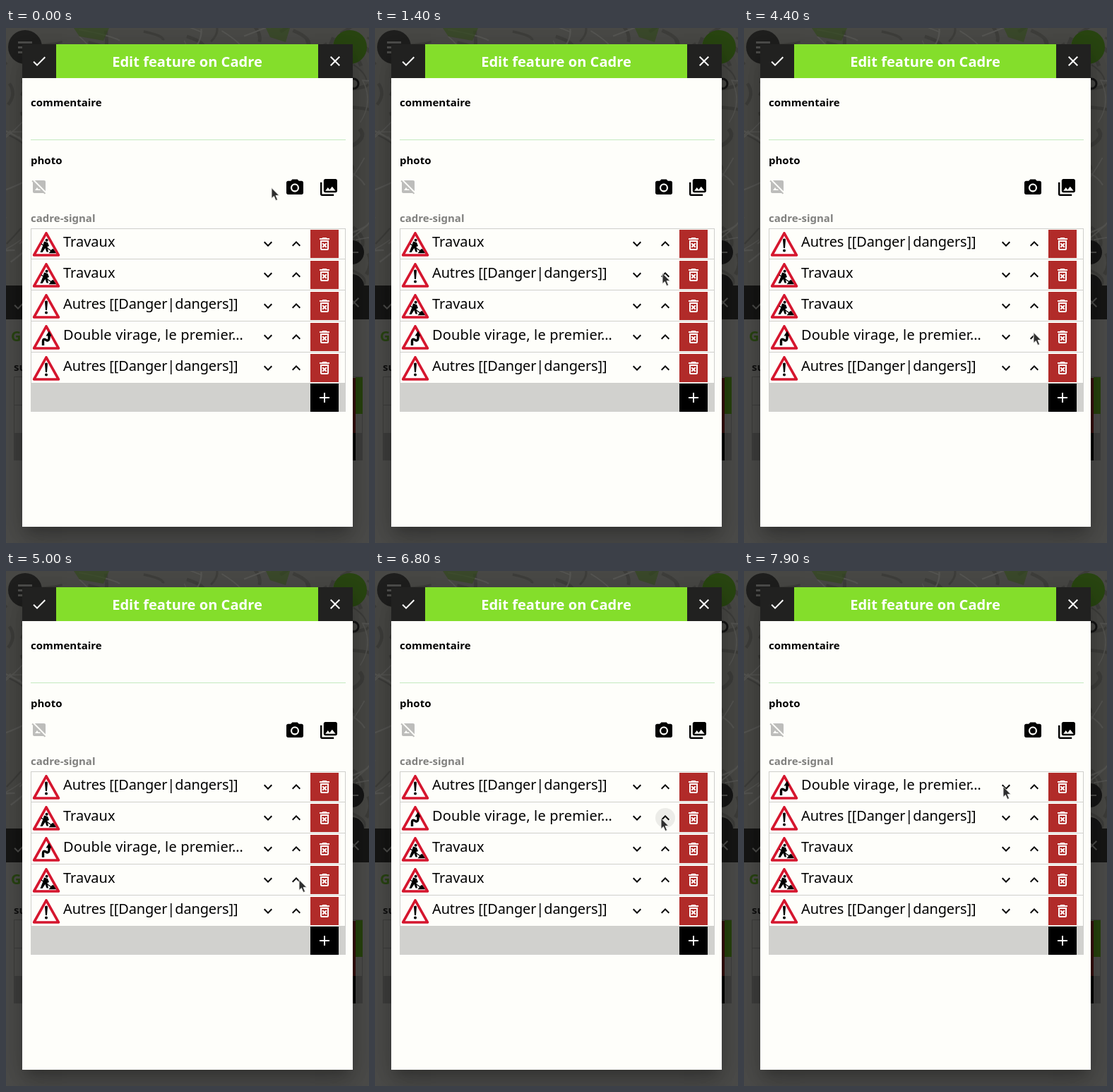
An HTML page that plays this animation: 514x730 px, repeating every 8 s.

```html
<!DOCTYPE html>
<html lang="en">
<head>
<meta charset="utf-8">
<title>Edit feature</title>
<style>
  html, body { margin: 0; width: 100%; height: 100%; overflow: hidden; background: #4d4d4b; }
  svg, .dialog { position: absolute; left: 0; top: 0; }
  svg { width: 514px; height: 730px; font-family: "Noto Sans", "Open Sans", sans-serif; }
  .dialog {
    left: 23px; top: 23px; width: 468px; height: 684px; background: #fefefa;
    box-shadow: 0 11px 15px -7px rgba(0,0,0,.2), 0 24px 38px 3px rgba(0,0,0,.14), 0 9px 46px 8px rgba(0,0,0,.12);
  }
  .title { font-size: 20.1px; font-weight: 700; fill: #fff; text-anchor: middle; }
  .label { font-size: 15px; font-weight: 700; }
  .name { font-size: 20px; }
  .tight { letter-spacing: -.14px; }
  .wide { letter-spacing: .17px; }
  .white { fill: #fff; }

  .item, .cursor, .ripple { animation: 8s step-end infinite; }
  .work1 { animation-name: work1; }
  .work2 { animation-name: work2; }
  .danger { animation-name: danger; }
  .bend { animation-name: bend; }
  .last { transform: translate(35px, 460px); }
  .cursor { animation-name: cursor; }
  .ripple { animation-name: ripple; fill: #000; }

  @keyframes work1 {
    0% { transform: translate(35px, 284px); }
    21.25% { transform: translate(35px, 328px); }
    70%, 100% { transform: translate(35px, 372px); }
  }
  @keyframes work2 {
    0% { transform: translate(35px, 328px); }
    11.25% { transform: translate(35px, 372px); }
    60%, 100% { transform: translate(35px, 416px); }
  }
  @keyframes danger {
    0% { transform: translate(35px, 372px); }
    11.25% { transform: translate(35px, 328px); }
    21.25% { transform: translate(35px, 284px); }
    86.25%, 100% { transform: translate(35px, 328px); }
  }
  @keyframes bend {
    0% { transform: translate(35px, 416px); }
    60% { transform: translate(35px, 372px); }
    70% { transform: translate(35px, 328px); }
    86.25%, 100% { transform: translate(35px, 284px); }
  }
  @keyframes ripple {
    0% { transform: translate(411px, 394px); opacity: 0; }
    10% { transform: translate(411px, 394px); opacity: .07; }
    11.25% { transform: translate(411px, 394px); opacity: .03; }
    12.5% { transform: translate(411px, 350px); opacity: 0; }
    20% { transform: translate(411px, 350px); opacity: .07; }
    21.25% { transform: translate(411px, 438px); opacity: 0; }
    58.75% { transform: translate(411px, 438px); opacity: .07; }
    60% { transform: translate(411px, 438px); opacity: .03; }
    61.25% { transform: translate(411px, 350px); opacity: 0; }
    85% { transform: translate(411px, 350px); opacity: .07; }
    86.25% { transform: translate(411px, 350px); opacity: .03; }
    87.5% { transform: translate(411px, 306px); opacity: 0; }
    93.75% { transform: translate(411px, 306px); opacity: .07; }
    96.25% { transform: translate(411px, 306px); opacity: .03; }
    97.5%, 100% { transform: translate(411px, 306px); opacity: 0; }
  }
  @keyframes cursor {
    0% { transform: translate(376px, 226px); }
    3.75% { transform: translate(393px, 285px); }
    5% { transform: translate(417px, 362px); }
    6.25% { transform: translate(426px, 392px); }
    8.75% { transform: translate(414px, 396px); }
    10% { transform: translate(408px, 397px); }
    12.5% { transform: translate(407px, 397px); }
    15% { transform: translate(407px, 383px); }
    16.25% { transform: translate(407px, 357px); }
    17.5% { transform: translate(407px, 347px); }
    25% { transform: translate(406px, 346px); }
    30% { transform: translate(405px, 345px); }
    32.5% { transform: translate(404px, 345px); }
    45% { transform: translate(404px, 352px); }
    46.25% { transform: translate(403px, 375px); }
    47.5% { transform: translate(405px, 396px); }
    48.75% { transform: translate(406px, 404px); }
    51.25% { transform: translate(407px, 409px); }
    52.5% { transform: translate(409px, 420px); }
    53.75% { transform: translate(410px, 428px); }
    55% { transform: translate(410px, 431px); }
    57.5% { transform: translate(413px, 437px); }
    58.75% { transform: translate(415px, 441px); }
    62.5% { transform: translate(415px, 437px); }
    65% { transform: translate(411px, 425px); }
    66.25% { transform: translate(407px, 416px); }
    68.75% { transform: translate(406px, 406px); }
    70% { transform: translate(406px, 403px); }
    75% { transform: translate(399px, 394px); }
    76.25% { transform: translate(387px, 378px); }
    77.5% { transform: translate(377px, 365px); }
    78.75% { transform: translate(375px, 361px); }
    81.25% { transform: translate(389px, 357px); }
    82.5% { transform: translate(402px, 351px); }
    83.75% { transform: translate(405px, 350px); }
    87.5% { transform: translate(406px, 333px); }
    88.75% { transform: translate(407px, 312px); }
    90% { transform: translate(407px, 305px); }
    95% { transform: translate(404px, 305px); }
    96.25% { transform: translate(391px, 305px); }
    97.5% { transform: translate(374px, 305px); }
    98.75%, 100% { transform: translate(367px, 305px); }
  }
</style>
</head>
<body>
<svg viewBox="0 0 514 730">
  <rect width="514" height="366" fill="#494946"/>
  <g id="map" fill="none"></g>
  <g fill="#34491f" opacity=".7">
    <path d="M96 0H146L138 18L104 12Z"/><path d="M368 0H402L396 20L374 13Z"/>
  </g>
  <circle cx="27" cy="27" r="24" fill="#1f1f1e"/>
  <path d="M17 20.5H37M17 27.5H37M17 34.5H37" stroke="#4d4d4b" stroke-width="3"/>
  <circle cx="487" cy="27" r="24" fill="#294611"/>
  <circle cx="492" cy="79" r="7" fill="none" stroke="#161616" stroke-width="3"/>
  <g fill="#161616"><circle cx="490" cy="318" r="17"/><circle cx="490" cy="366" r="17"/></g>
  <path d="M485 318H499" stroke="#4d4d4b" stroke-width="2"/>
  <rect y="365" width="514" height="48" fill="#161615"/>
  <g fill="#4d4d4b"><use href="#check" x="8" y="380"/><use href="#close" x="481" y="377"/></g>
  <text x="7" y="444" font-size="20" font-weight="700" fill="#294611">G</text>
  <text class="label" x="11" y="486" fill="#111">su</text>
  <rect x="11.5" y="494.5" width="493" height="118" fill="none" stroke="#3e3e3d"/>
  <path d="M11 534.5H505" stroke="#3e3e3d"/>
  <rect x="11" y="574" width="494" height="39" fill="#3f3f3e"/>
  <rect x="485" y="496" width="10" height="78" fill="#360d0c"/>
  <rect x="495" y="495" width="10" height="52" fill="#28430d"/>
  <rect x="485" y="574" width="10" height="39"/>
</svg>

<div class="dialog"></div>

<svg viewBox="0 0 514 730">
  <defs>
    <path id="check" d="M9 16.17L4.83 12l-1.42 1.41L9 19 21 7l-1.41-1.41z"/>
    <path id="close" d="M19 6.41L17.59 5 12 10.59 6.41 5 5 6.41 10.59 12 5 17.59 6.41 19 12 13.41 17.59 19 19 17.59 13.41 12z"/>
    <path id="down" d="M16.59 8.59L12 13.17 7.41 8.59 6 10l6 6 6-6z"/>
    <path id="up" d="M12 8l-6 6 1.41 1.41L12 10.83l4.59 4.58L18 14z"/>
    <path id="trash" d="M14.12 10.47L12 12.59l-2.13-2.12-1.41 1.41L10.59 14l-2.12 2.12 1.41 1.41L12 15.41l2.12 2.12 1.41-1.41L13.41 14l2.12-2.12zM15.5 4l-1-1h-5l-1 1H5v2h14V4zM6 19c0 1.1.9 2 2 2h8c1.1 0 2-.9 2-2V7H6v12zM8 9h8v10H8V9z"/>
    <path id="sign" d="M22 6.8L39.4 38H4.6Z" fill="#fff" stroke="#d5162e" stroke-width="3.6" stroke-linejoin="round"/>
    <g id="work">
      <use href="#sign"/>
      <circle cx="22.6" cy="16.8" r="2"/>
      <path d="M19 18.5L24 20L26 25L23.5 26L25 33.5H22.5L20.5 28L16.5 34H13.5L17 25Z"/>
      <path d="M15 22L30 32.5" stroke="#000" stroke-width="1.3"/>
      <path d="M25.5 35.3L30 29.5L32 29L36 35.3Z"/>
    </g>
    <g id="danger">
      <use href="#sign"/>
      <path d="M20 15.5Q22 13.5 24 15.5L23 28H21Z"/><circle cx="22" cy="31.5" r="2"/>
    </g>
    <g id="bend">
      <use href="#sign"/>
      <path d="M17.5 34V28Q17.5 24.5 20.5 25.5L23 27Q26 27.5 26 23V19" fill="none" stroke="#000" stroke-width="3.4"/>
      <path d="M21.5 20.5L26 13.5L29.5 20.5Z"/>
    </g>
    <g id="tools">
      <use href="#down" x="359" y="10"/><use href="#up" x="399" y="10"/>
      <rect x="431" y="2" width="40" height="40" fill="#b12b29"/>
      <use class="white" href="#trash" x="439" y="10"/>
      <path d="M35 43.5H481" stroke="#cfcfcc"/>
    </g>
  </defs>

  <rect x="23" y="23" width="468" height="48" fill="#212120"/>
  <rect x="71" y="23" width="371" height="48" fill="#84de2b"/>
  <use class="white" href="#check" x="35" y="35"/>
  <use class="white" href="#close" x="454" y="35"/>
  <text class="title" x="256.5" y="55">Edit feature on Cadre</text>

  <text class="label" x="35" y="111">commentaire</text>
  <path d="M35 158.5H481" stroke="#c4e9c0"/>
  <text class="label" x="35" y="193">photo</text>
  <path transform="translate(35 213)" fill="#bdbdbb" d="M21 5c0-1.1-.9-2-2-2H5.83L21 18.17V5zM2.81 2.81L1.39 4.22 3 5.83V19c0 1.1.9 2 2 2h13.17l1.61 1.61 1.41-1.41L2.81 2.81zM6 17l3-4 2.25 3 .82-1.1 2.1 2.1H6z"/>
  <g transform="translate(394.6 212) scale(1.2)">
    <circle cx="12" cy="12" r="3.2"/>
    <path d="M9 2L7.17 4H4c-1.1 0-2 .9-2 2v12c0 1.1.9 2 2 2h16c1.1 0 2-.9 2-2V6c0-1.1-.9-2-2-2h-3.17L15 2H9zm3 15c-2.76 0-5-2.24-5-5s2.24-5 5-5 5 2.24 5 5-2.24 5-5 5z"/>
  </g>
  <path transform="translate(442.6 211.6) scale(1.2)" d="M22 16V4c0-1.1-.9-2-2-2H8c-1.1 0-2 .9-2 2v12c0 1.1.9 2 2 2h12c1.1 0 2-.9 2-2zm-11-4l2.03 2.71L16 11l4 5H8l3-4zM2 6v14c0 1.1.9 2 2 2h14v-2H4V6H2z"/>
  <text class="label" x="35" y="275" fill="#80807e">cadre-signal</text>

  <use href="#tools" y="284"/>
  <use href="#tools" y="328"/>
  <use href="#tools" y="372"/>
  <use href="#tools" y="416"/>
  <use href="#tools" y="460"/>
  <rect x="35.5" y="284.5" width="445" height="259" fill="none" stroke="#cfcfcc"/>
  <rect x="35" y="504" width="446" height="40" fill="#d1d1ce"/>
  <rect x="431" y="504" width="40" height="40"/>
  <path d="M444 524H458M451 517V531" stroke="#fff" stroke-width="2"/>

  <g class="item work1"><use href="#work"/><text class="name" x="46" y="26">Travaux</text></g>
  <g class="item work2"><use href="#work"/><text class="name" x="46" y="26">Travaux</text></g>
  <g class="item danger"><use href="#danger"/><text class="name tight" x="46" y="26">Autres [[Danger|dangers]]</text></g>
  <g class="item bend"><use href="#bend"/><text class="name wide" x="46" y="26">Double virage, le premier…</text></g>
  <g class="last"><use href="#danger"/><text class="name tight" x="46" y="26">Autres [[Danger|dangers]]</text></g>

  <circle class="ripple" r="14"/>
  <path class="cursor" d="M0 .5V15.5L3.4 12.4L6 18.5L8.6 17.4L6 11.4H10.8Z" fill="#2e2e2e" stroke="#f4f4f0" stroke-width=".9"/>
</svg>

<script>
  // Dimmed street map behind the dialog
  let seed = 7;
  const rnd = n => (seed = seed * 16807 % 2147483647) / 2147483647 * n;
  const street = (color, width, reach) => {
    const x = rnd(514), y = rnd(366), a = rnd(6.28);
    const dx = Math.cos(a) * reach, dy = Math.sin(a) * reach;
    const y2 = Math.min(365, y + dy);
    return `<path d="M${x} ${y}Q${x + dx / 2 + rnd(20)} ${(y + y2) / 2} ${x + dx} ${y2}" stroke="${color}" stroke-width="${width}"/>`;
  };
  let streets = "";
  for (let i = 0; i < 150; i++) streets += street("#3e3e3b", 2 + rnd(4), 30);
  for (let i = 0; i < 110; i++) streets += street("#565653", 1 + rnd(1.5), 60);
  document.getElementById("map").innerHTML = streets;
</script>
</body>
</html>
```
